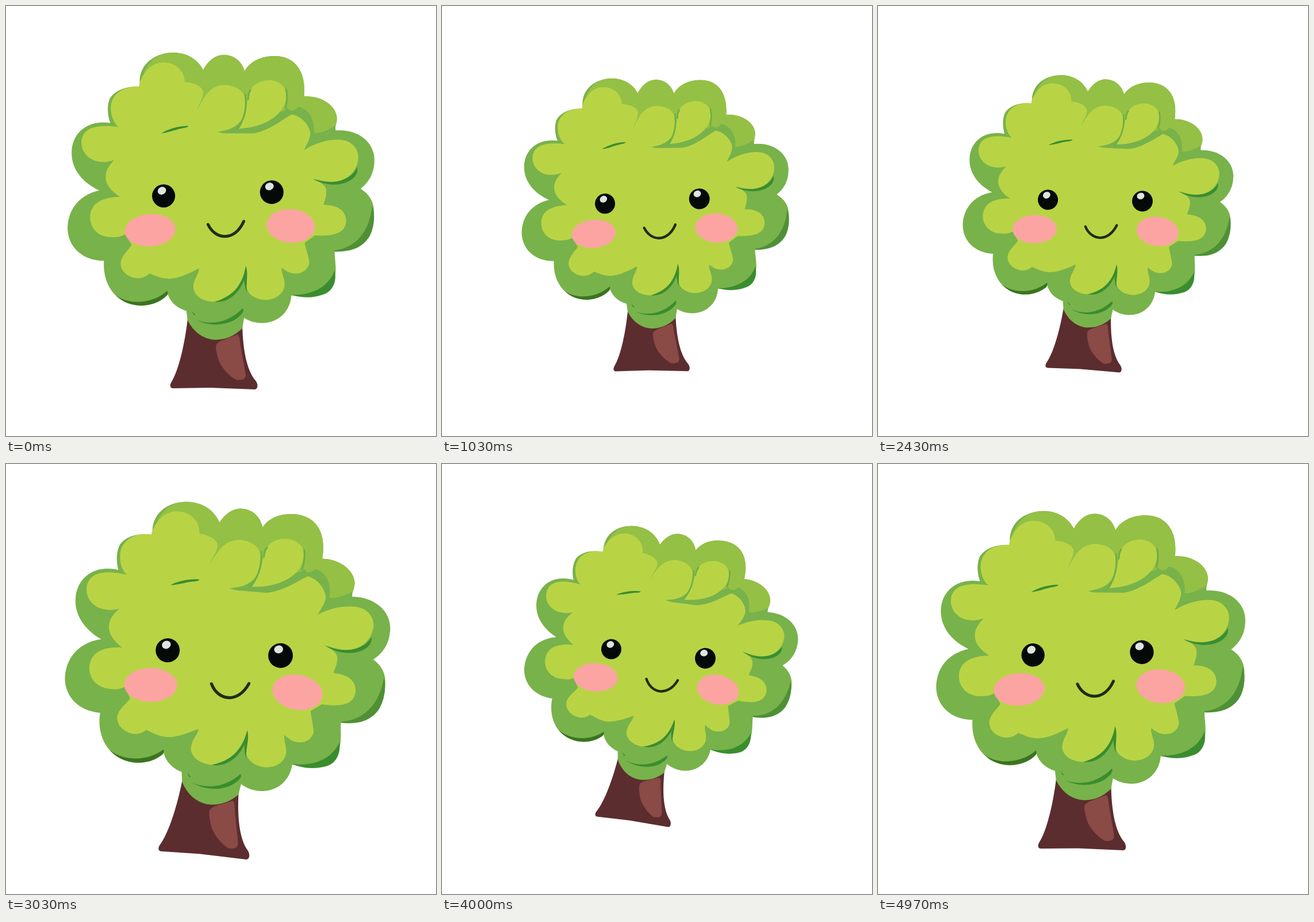
Animation of 748 by 748 pixels, one loop 5.01 s. Source, as an HTML page:

```html
<!DOCTYPE html>
<html lang="en">
<head>
<meta charset="utf-8">
<title>Happy tree</title>
<style>
  html, body { margin: 0; width: 100%; height: 100%; overflow: hidden; background: #fff; }
  svg { display: block; width: 100vw; height: 100vh; }
  .trunk { fill: #5c2d2f; }
  .shine { fill: #8a4a46; }
  .leaf { fill: #78b24a; }
  .crown { fill: #94c045; }
  .light { fill: #b8d445; }
  .dark { fill: #3a8d2f; }
  .shade { fill: #4f9036; }
  .deep { fill: #3b7420; }
  .vein { fill: none; stroke: #6fae45; stroke-width: 3; stroke-linecap: round; }
  .cheek { fill: #fca4a2; }
  .eye { fill: #050a08; }
  .glint { fill: #dbe6de; }
  .smile { fill: none; stroke: #1f2d14; stroke-width: 5; stroke-linecap: round; }
</style>
</head>
<body>
<svg viewBox="0 0 748 748">
  <g id="tree">
    <path class="trunk" d="M316 545C312 580 302 632 287 655C285 660 286 664 291 664L355 663L433 666C439 665 438 656 434 651C418 632 412 595 411 556L364 540Z"/>
    <path class="shine" d="M366 588C370 582 385 578 402 571C406 572 406 578 407 585C411 610 416 632 417 642C416 649 411 650 402 650C388 644 372 625 369 612C366 602 364 592 366 588Z"/>

    <path class="leaf" d="M233 134C232 100 262 82 291 82C317 82 335 96 343 112C352 96 364 86 379 86C396 86 410 97 415 114C424 98 443 88 467 88C502 88 522 114 518 158C548 156 574 174 575 195C575 205 571 211 573 217C610 214 640 236 640 268C640 292 630 307 616 318C632 328 640 342 639 360C638 400 612 428 571 427C571 438 573 445 573 460C571 492 545 510 496 503C494 532 472 551 445 551C432 551 422 547 414 542L411 560C396 575 380 580 364 580C343 579 326 566 316 546L314 530C298 525 286 515 281 499C270 513 255 521 235 521C198 520 168 490 171 443C133 443 108 418 108 386C109 350 132 328 163 321C135 308 115 285 115 256C115 222 142 198 182 204C177 190 176 175 181 162C190 147 210 140 232 141Z"/>
    <path class="crown" d="M240 118C250 92 270 82 291 82C317 82 335 96 343 112C352 96 364 86 379 86C396 86 410 97 415 114C424 98 443 88 467 88C502 88 522 114 518 158C548 156 574 174 575 195C575 202 574 205 573 208C560 216 548 222 535 222C538 200 526 178 507 176C503 184 496 183 488 181L420 205L335 185L280 150Z"/>

    <path class="light" d="M233 135C240 112 256 99 274 99C296 99 311 114 311 133C325 134 341 139 343 150C343 162 336 170 333 181C345 160 352 140 380 138C405 139 419 152 417 175C414 200 402 215 369 219L400 222L430 222C455 218 475 202 496 189C515 192 528 210 529 222C528 235 520 245 518 251C530 244 550 233 577 233C600 233 612 248 612 264C611 288 592 305 568 306C555 306 545 303 535 301C545 306 553 310 556 318C558 332 553 338 552 346C575 346 591 355 591 374C590 395 570 401 537 399L519 412C522 425 527 440 527 447C524 462 510 466 500 465C490 464 484 458 479 455C479 468 486 475 484 488C480 504 465 511 450 511C432 510 418 500 417 484C416 472 420 462 417 453C415 470 400 510 362 514C342 514 326 503 326 488C327 473 336 466 336 456C322 463 300 475 281 474C268 473 258 468 250 465C242 472 235 474 226 473C210 470 200 460 200 447C201 434 213 425 219 415L208 397C198 403 192 402 180 402C160 400 147 386 147 367C148 345 165 333 199 332C186 324 174 312 174 298C174 285 180 278 189 268C178 272 170 272 162 271C143 268 131 253 132 236C134 214 155 205 197 211C188 205 182 190 183 175C185 155 202 140 232 141Z"/>
    <path class="leaf" d="M367 219C378 221 392 217 400 215C440 214 470 198 489 178L499 188C475 198 462 218 425 221C402 220 382 225 367 219Z"/>
    <path class="light" d="M405 214C418 198 418 165 425 147C432 134 448 129 462 130C482 134 488 146 487 160C484 190 450 212 405 214Z"/>
    <path class="vein" d="M416 155C419 175 417 195 402 214M425 147C421 153 421 158 421 163M487 146C490 160 488 170 486 178"/>

    <path class="dark" d="M270 222C284 214 300 209 317 209C318 211 314 212 303 214C290 217 282 221 270 222Z"/>
    <path class="dark" d="M533 301C565 312 598 306 610 281C616 302 575 324 533 301Z"/>
    <path class="dark" d="M417 452C412 480 400 503 363 514C385 517 406 500 414 476C415 485 416 492 419 497C417 480 422 465 417 452Z"/>
    <path class="dark" d="M332 546C360 556 390 548 412 525C415 531 410 536 400 544C380 556 355 557 332 546ZM323 530L330 537L327 537Z"/>
    <path class="deep" d="M192 503C215 520 255 518 281 495C283 501 281 503 276 507C255 525 213 526 192 503Z"/>
    <path class="dark" d="M496 502C530 503 560 490 571 460C575 475 570 493 555 500C535 508 515 508 496 502Z"/>
    <path class="shade" d="M571 425C610 420 632 390 636 348C642 360 640 385 632 400C620 420 600 428 571 427Z"/>

    <ellipse class="cheek" cx="251" cy="390" rx="44" ry="28" transform="rotate(-4 251 390)"/>
    <ellipse class="cheek" cx="495" cy="382.5" rx="42" ry="29" transform="rotate(5 495 382.5)"/>
    <circle class="eye" cx="274.5" cy="330.5" r="20"/>
    <circle class="eye" cx="462" cy="324" r="20.5"/>
    <ellipse class="glint" cx="271.5" cy="321.5" rx="7.5" ry="6.5" transform="rotate(-30 271.5 321.5)"/>
    <ellipse class="glint" cx="458" cy="314" rx="7.5" ry="6.5" transform="rotate(-20 458 314)"/>
    <path class="smile" d="M351.500 380C364 407 398 410 413.500 374.500"/>
  </g>
</svg>
<script>
const LOOP = 5010, STEP = 100 / 3, LAST = 149;
const tree = document.getElementById('tree');

// Drift: time, centre x, centre y, tilt in degrees
const drift = [
  [0, 374, 373.5, 0], [244, 372.5, 376, 0], [430, 370.3, 378.7, 0.1],
  [530, 369.6, 380, 0], [1070, 371.5, 380, -1], [1600, 374, 378.3, -1.5],
  [1735, 374, 378, -1.2], [2130, 379, 378.5, 1.3], [2430, 380.8, 379, 2.83],
  [3200, 381.5, 376.5, 5.2], [3530, 380.7, 371.2, 6.8], [3730, 379, 371, 7.3],
  [4470, 370.6, 371.3, 7.27], [4700, 369.5, 374.8, 4.2], [4800, 369.5, 376, 2.7],
  [4967, 369.7, 376.5, 0.46]
];

// Moments at which the tree is largest
const beats = [-1215, 262, 1742, 3208, 4715, 6200];

function slope(i, c) {
  const a = drift[Math.max(i - 1, 0)], b = drift[Math.min(i + 1, drift.length - 1)];
  return (b[c] - a[c]) / (b[0] - a[0]);
}

// Smooth cubic through the drift points
function at(t, c) {
  let i = 0;
  while (i < drift.length - 2 && drift[i + 1][0] <= t) i++;
  const a = drift[i], b = drift[i + 1], d = b[0] - a[0];
  const u = Math.min((t - a[0]) / d, 1), v = 1 - u;
  return v * v * (1 + 2 * u) * a[c] + u * u * (3 - 2 * u) * b[c]
    + d * u * v * (v * slope(i, c) - u * slope(i + 1, c));
}

function scaleAt(t) {
  const i = beats.findIndex(b => b > t);
  const u = (t - beats[i - 1]) / (beats[i] - beats[i - 1]);
  return 1.147 - 0.272 * Math.sin(Math.PI * u);
}

function draw(now) {
  const n = Math.min(Math.floor((now % LOOP + 4) / STEP), LAST);
  const t = n * STEP;
  tree.setAttribute('transform',
    `translate(${at(t, 1)} ${at(t, 2)}) rotate(${at(t, 3)}) scale(${scaleAt(t)}) translate(-374 -373.5)`);
}

const start = performance.now();
function tick() {
  draw(performance.now() - start);
  requestAnimationFrame(tick);
}
tick();
</script>
</body>
</html>
```
